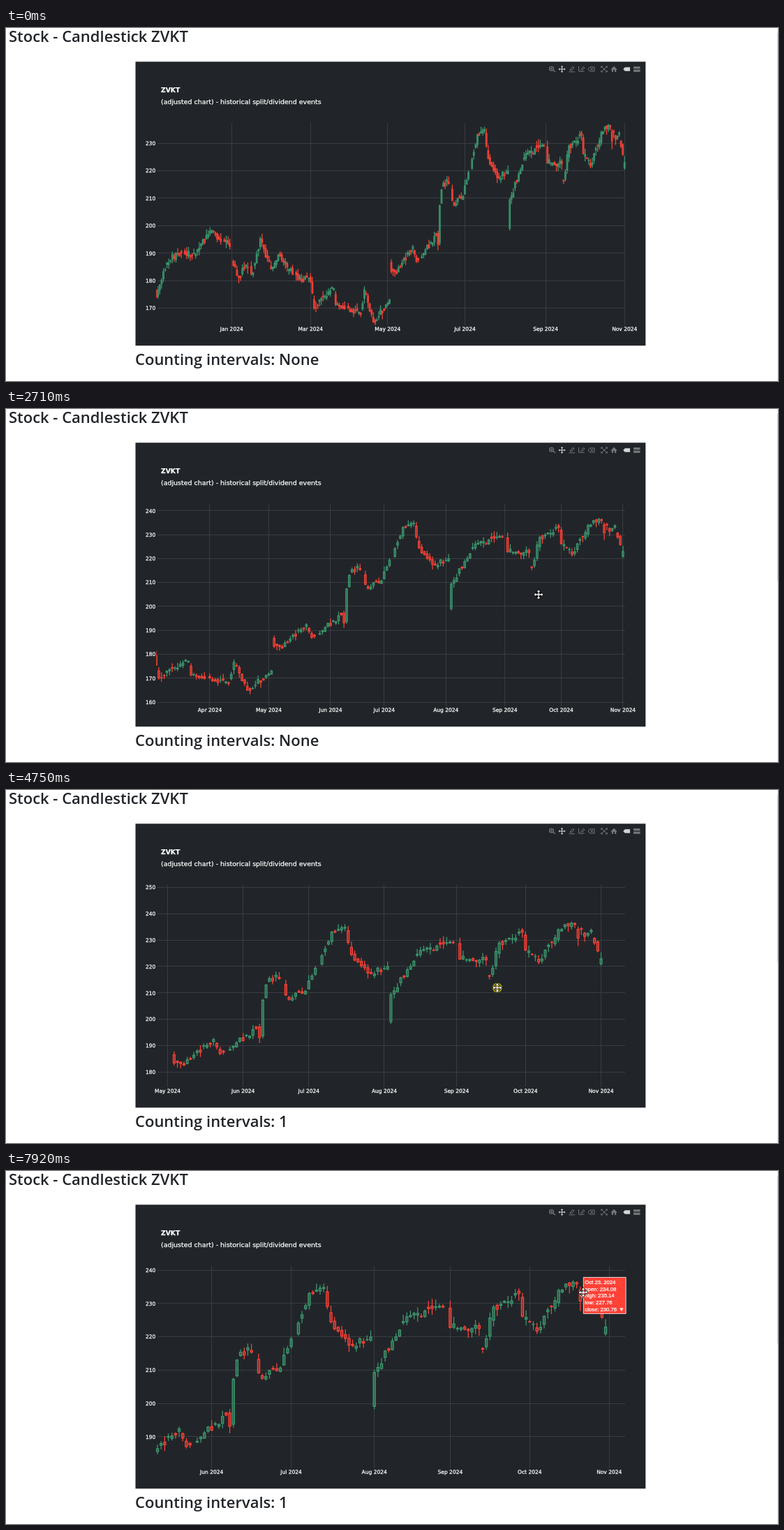
Recreate the animation shown at these times as an HTML page with a canvas. Size 1106 px wide and 506 px high, loop 7.99 s.

```html
<!DOCTYPE html>
<html lang="en">
<head>
<meta charset="utf-8">
<title>Candlestick chart</title>
<style>
html, body { margin: 0; width: 100%; height: 100%; overflow: hidden; background: #fff; }
canvas { display: block; }
</style>
</head>
<body>
<canvas id="stage" width="1106" height="506"></canvas>
<script>
const ctx = document.getElementById('stage').getContext('2d');
const LOOP = 7990;
const LEFT = 217, RIGHT = 887, TOP = 136, BOTTOM = 426;
const GREEN = '#3d9970', RED = '#ff4136', DARK = '#212529', GRID = '#393c40';
const TICKER = 'ZVKT';
const SANS = '"DejaVu Sans", sans-serif';
const PEAK = 237.5;

// Turning points: weekday counted from 3 Nov 2023, close, and the open after a gap.
const TURNS = [
  [-1, 174], [5, 186.4], [10, 190], [21, 189.6], [29, 198], [40, 192.5], [42, 185.6, 187], [45, 181.2],
  [49, 185.6], [53, 182.7], [57, 195.2], [63, 184.4], [67, 189.3], [75, 182.3], [85, 179.7], [87, 170.1],
  [98, 177], [99, 171.4], [113, 167.8], [115, 176.6], [120, 165], [129, 173], [130, 183.4, 186.6],
  [133, 182.6], [142, 192.3], [144, 187], [155, 196.5], [156, 193.1], [157, 207.2, 193.7], [158, 213],
  [161, 216.7], [165, 207.5], [170, 210.6], [178, 233], [182, 234.8], [184, 224.5], [189, 217.5],
  [195, 219.9], [196, 209.3, 199.1], [205, 226], [215, 229], [217, 222.8, 228.6], [225, 222.5],
  [226, 216.3, 216.5], [229, 228.9, 225], [236, 233], [237, 226.2], [241, 221.7], [247, 233.9],
  [252, 235.9], [255, 231.4], [257, 233.7], [260, 222.9]
];
const HOLIDAYS = new Set([14, 36, 41, 51, 76, 105, 146, 163, 174, 216]);

// Hover labels: start, end, side, day, date, then open, high, low, close.
const TIPS = [
  [5500, 6000, -1, 260, 'Nov 1, 2024', 220.97, 225.35, 220.27, 222.91],
  [6130, 6500, -1, 259, 'Oct 31, 2024', 229.34, 229.83, 225.37, 225.91],
  [6640, 7000, 1, 257, 'Oct 29, 2024', 233.10, 234.33, 232.32, 233.67],
  [7310, LOOP, 1, 253, 'Oct 23, 2024', 234.08, 235.14, 227.76, 230.76]
];

// Tracks: start, glide time, then the values reached.
// Views: first day, last day, top price, bottom price, tick day of the month.
const VIEWS = [
  [0, 0, -0.3, 260.3, 237.36, 163.8, 1],
  [900, 0, 41.7, 255.9, 241.8, 159.23, 1],
  [1520, 420, 54.05, 268.2, 257.84, 175.15, 3],
  [2080, 0, 54.05, 268.2, 241.8, 159.23, 3],
  [2480, 0, 86.5, 260.8, 242.86, 158.25, 1],
  [2850, 400, 97.5, 271.8, 246.7, 162.05, 1],
  [3560, 0, 121.4, 263.8, 242.86, 158.25, 1],
  [4010, 70, 121.4, 263.8, 249.78, 173.1, 1],
  [4560, 260, 126.2, 268.6, 251.3, 174.7, 1],
  [4890, 0, 136, 265.4, 241.32, 180.5, 3]
];
const POINTER = [
  [190, 0, 1064, 480], [190, 710, 815, 258], [900, 490, 803, 254], [1390, 130, 797.5, 257.5],
  [1520, 420, 759, 314], [2150, 350, 763, 266], [2850, 400, 720, 279], [4560, 260, 698, 285],
  [4820, 490, 892, 241.5], [5380, 350, 861, 231], [5930, 350, 855, 204], [6420, 750, 829, 173],
  [7240, 350, 821.5, 171.5], [7920, 0, 827, 174]
];
const FIT_DELAY = 160;

const mix = (a, b, k) => a + (b - a) * k;

function makeRandom(seed) {
  return () => (seed = (seed * 16807) % 2147483647) / 2147483647;
}

function makeCandles() {
  const rnd = makeRandom(4217), list = [];
  let prev = 176;
  for (let i = -1; i <= 260; i++) {
    if (HOLIDAYS.has(i)) continue;
    const k = TURNS.findIndex(p => p[0] >= i);
    const [day, price, gapOpen] = TURNS[k];
    const [day0, price0] = TURNS[Math.max(k - 1, 0)];
    const onTurn = day === i;
    const close = onTurn ? price : mix(price0, price, (i - day0) / (day - day0)) + (rnd() - 0.5) * 2.4;
    const open = onTurn && gapOpen || mix(prev, close, rnd() * 0.7) + (rnd() - 0.5) * 1.6;
    const wick = () => 0.3 + 2 * rnd() ** 2;
    const high = Math.min(Math.max(open, close) + wick(), PEAK);
    const low = Math.min(open, close) - wick();
    const tip = TIPS.find(p => p[3] === i);
    list.push(tip ? [i, ...tip.slice(5)] : [i, open, high, low, close]);
    prev = close;
  }
  return list;
}
const candles = makeCandles();

function follow(track, t) {
  const k = track.findLastIndex(p => p[0] <= t);
  if (k < 0) return null;
  const [start, glide, ...to] = track[k];
  if (t >= start + glide) return to;
  const from = track[k - 1].slice(2);
  return to.map((v, j) => mix(from[j], v, (t - start) / glide));
}

// A wheel zoom first scales the prices about the pointer, then fits them.
function viewAt(t, pointer) {
  const view = follow(VIEWS, t);
  const k = VIEWS.findLastIndex(v => v[0] <= t);
  const [start, glide] = VIEWS[k];
  view[4] = VIEWS[k][6];
  if (k === 0 || glide > 0 || t > start + FIT_DELAY) return view;
  const [first, last, high, low] = VIEWS[k - 1].slice(2);
  const ratio = (view[1] - view[0]) / (last - first);
  const still = mix(high, low, (pointer[1] - TOP) / (BOTTOM - TOP));
  return [view[0], view[1], mix(still, high, ratio), mix(still, low, ratio), view[4]];
}

const isDragging = t => VIEWS.some(([start, glide]) => glide > 100 && t >= start && t < start + glide + 70);

// Weekend dates fall on the next Monday.
function weekdayIndex(year, month, day) {
  const n = Math.round((Date.UTC(year, month, day) - Date.UTC(2023, 9, 30)) / 864e5);
  return Math.floor(n / 7) * 5 + Math.min(n % 7, 5) - 4;
}

function text(str, x, y, font, color = '#fff', align = 'left') {
  ctx.font = font;
  ctx.fillStyle = color;
  ctx.textAlign = align;
  ctx.fillText(str, x, y);
}

// Small chart text gets a hairline outline to look firmer.
function label(str, x, y, font, align) {
  text(str, x, y, font, '#fff', align);
  ctx.strokeStyle = '#fff';
  ctx.lineWidth = 0.25;
  ctx.strokeText(str, x, y);
}

function line(...pts) {
  ctx.beginPath();
  for (let i = 0; i < pts.length; i += 2) ctx.lineTo(pts[i], pts[i + 1]);
  ctx.stroke();
}

function shape(x, y, pts) {
  ctx.beginPath();
  for (let i = 0; i < pts.length; i += 2) ctx.lineTo(x + pts[i], y + pts[i + 1]);
  ctx.closePath();
}

// A four-way arrow of the given reach.
function moveShape(x, y, r) {
  const a = r * 0.1, b = r * 0.36, c = r * 0.6, pts = [];
  for (let q = 0; q < 4; q++) {
    const sin = Math.round(Math.sin(q * Math.PI / 2)), cos = Math.round(Math.cos(q * Math.PI / 2));
    for (const [u, v] of [[-a, -a], [-a, -c], [-b, -c], [0, -r], [b, -c], [a, -c]])
      pts.push(u * cos - v * sin, u * sin + v * cos);
  }
  shape(x, y, pts);
}

function drawToolbar() {
  const y = 59;
  ctx.strokeStyle = ctx.fillStyle = '#73767a';
  ctx.lineWidth = 1.3;
  ctx.beginPath();
  ctx.arc(781.5, y - 0.7, 2.9, 0, 7);
  ctx.stroke();
  line(784, y + 1.5, 787, y + 4);
  ctx.lineWidth = 1;
  line(780, y - 0.7, 783, y - 0.7);
  line(781.5, y - 2.2, 781.5, y + 0.8);
  line(806.5, y + 3.8, 815, y + 3.8);
  line(808, y + 1.5, 811.5, y - 3.3, 814, y - 2.5, 811, y + 1.3, 808, y + 1.5);
  line(820.5, y - 4, 820.5, y + 3, 823, y + 3.5, 828.5, y + 3);
  line(823, y + 2, 827, y - 3.5, 829, y - 2, 825, y + 2);
  line(834, y, 836.5, y - 3, 843, y - 3, 843, y + 3, 836.5, y + 3, 834, y);
  line(837.5, y - 1.5, 841, y + 1.5);
  line(841, y - 1.5, 837.5, y + 1.5);
  for (const sx of [-1, 1]) for (const sy of [-1, 1]) {
    line(857, y, 857 + sx * 4, y + sy * 3.8);
    line(857 + sx * 2, y + sy * 4, 857 + sx * 4.3, y + sy * 4, 857 + sx * 4.3, y + sy * 2);
  }
  shape(871, y, [0, -4.2, 4.8, 0.4, 3.2, 0.4, 3.2, 4, 1, 4, 1, 1, -1, 1, -1, 4, -3.2, 4, -3.2, 0.4, -4.8, 0.4]);
  ctx.fill();
  ctx.fillRect(899, y - 3.8, 9.5, 3.2);
  ctx.fillRect(899, y + 0.7, 9.5, 3.2);
  ctx.fillStyle = '#d3d4d4';
  moveShape(796.5, y, 5);
  ctx.fill();
  shape(889, y, [-4.8, 0, -2.2, -2.8, 5, -2.8, 5, 2.8, -2.2, 2.8]);
  ctx.fill();
}

function drawPage(t) {
  const heading = '600 22px "Open Sans", "Noto Sans", sans-serif';
  ctx.fillStyle = '#fff';
  ctx.fillRect(0, 0, 1106, 506);
  text('Stock - Candlestick ' + TICKER, 4, 20, heading, DARK);
  text('Counting intervals: ' + (t < 3320 ? 'None' : '1'), 185, 483, heading, DARK);
  ctx.fillStyle = '#eaeaea';
  ctx.fillRect(1105, 0, 1, 506);
  ctx.fillStyle = '#c4c4c4';
  ctx.fillRect(1105, 7, 1, 240);
  ctx.fillStyle = DARK;
  ctx.fillRect(185.5, 48.3, 730.8, 407);
  label(TICKER, 222, 91.7, 'bold 9.2px ' + SANS);
  label('(adjusted chart) - historical split/dividend events', 222, 109, '9.45px ' + SANS);
  drawToolbar();
}

function drawAxes(view, toX, toY) {
  const [first, last, high, low, day] = view;
  const font = '7.5px ' + SANS;
  const grid = (...pts) => {
    ctx.lineWidth = 1;
    ctx.strokeStyle = GRID;
    line(...pts);
  };
  for (let p = Math.ceil(low / 10) * 10; p <= high; p += 10) {
    const y = Math.floor(toY(p)) + 0.5;
    grid(LEFT, y, RIGHT, y);
    label(String(p), 214.3, toY(p) + 2.8, font, 'right');
  }
  const names = 'Jan Feb Mar Apr May Jun Jul Aug Sep Oct Nov'.split(' ');
  const step = last - first > 230 ? 2 : 1;
  for (let m = 0; m < names.length; m += step) {
    const x = toX(weekdayIndex(2024, m, day));
    if (x < LEFT - 3 || x > RIGHT + 1) continue;
    const gx = Math.floor(x) + 0.5;
    if (x >= LEFT) grid(gx, TOP, gx, BOTTOM);
    label(names[m] + ' 2024', x, 434, font, 'center');
  }
}

function drawCandles(toX, toY, pitch) {
  const w = pitch * 0.6;
  ctx.save();
  ctx.beginPath();
  ctx.rect(LEFT - 2, TOP, RIGHT - LEFT + 3, BOTTOM - TOP);
  ctx.clip();
  ctx.lineWidth = 1.25;
  for (const [i, open, high, low, close] of candles) {
    const x = toX(i);
    const top = toY(Math.max(open, close)), bottom = toY(Math.min(open, close));
    ctx.strokeStyle = ctx.fillStyle = close >= open ? GREEN : RED;
    line(x, toY(high), x, top);
    line(x, bottom, x, toY(low));
    ctx.globalAlpha = 0.5;
    ctx.fillRect(x - w / 2, top, w, bottom - top);
    ctx.globalAlpha = 1;
    ctx.strokeRect(x - w / 2, top, w, bottom - top);
  }
  ctx.restore();
}

function drawTip(t, toX, toY) {
  const tip = TIPS.find(p => t >= p[0] && t < p[1]);
  if (!tip) return;
  const [, , side, i, date, open, high, low, close] = tip;
  const x = toX(i), y = toY((open + close) / 2);
  const near = side * 4.5, far = side * 65.3, h = 26;
  shape(x, y, [0, 0, near, -4, near, -h, far, -h, far, h, near, h, near, 4]);
  ctx.fillStyle = close >= open ? GREEN : RED;
  ctx.fill();
  ctx.strokeStyle = '#fff';
  ctx.lineWidth = 0.8;
  ctx.stroke();
  const tx = x + Math.min(near, far) + 2;
  const font = '7.7px "Liberation Sans", "DejaVu Sans", sans-serif';
  const rows = [date, ...Object.entries({ open, high, low, close }).map(([k, v]) => k + ': ' + v.toFixed(2))];
  rows.forEach((row, k) => label(row, tx, y - 16.6 + k * 9.75, font));
  label(close >= open ? '▲' : '▼', x + Math.max(near, far) - 2.5, y + 22.4, font, 'right');
}

function drawPointer(t, x, y) {
  if (isDragging(t)) {
    ctx.fillStyle = 'rgba(190, 176, 0, 0.85)';
    ctx.beginPath();
    ctx.arc(x, y, 7, 0, 7);
    ctx.fill();
  }
  const inPlot = x > LEFT && x < RIGHT && y > TOP && y < BOTTOM;
  if (inPlot) moveShape(x, y, 6.5);
  else shape(x, y, [0, 0, 0, 9, 2, 7.2, 3.5, 10.2, 5, 9.5, 3.6, 6.6, 6.3, 6.4]);
  ctx.strokeStyle = '#000';
  ctx.lineWidth = 1.2;
  ctx.stroke();
  ctx.fillStyle = '#fff';
  ctx.fill();
}

function draw(t) {
  const pointer = follow(POINTER, t);
  const view = viewAt(t, pointer);
  const [first, last, high, low] = view;
  const pitch = (RIGHT - LEFT) / (last - first);
  const toX = i => LEFT + (i - first) * pitch;
  const toY = p => TOP + (high - p) / (high - low) * (BOTTOM - TOP);
  drawPage(t);
  drawAxes(view, toX, toY);
  drawCandles(toX, toY, pitch);
  drawTip(t, toX, toY);
  if (pointer) drawPointer(t, ...pointer);
}

const begin = performance.now();
function tick() {
  draw((performance.now() - begin) % LOOP);
  requestAnimationFrame(tick);
}
tick();
</script>
</body>
</html>
```
